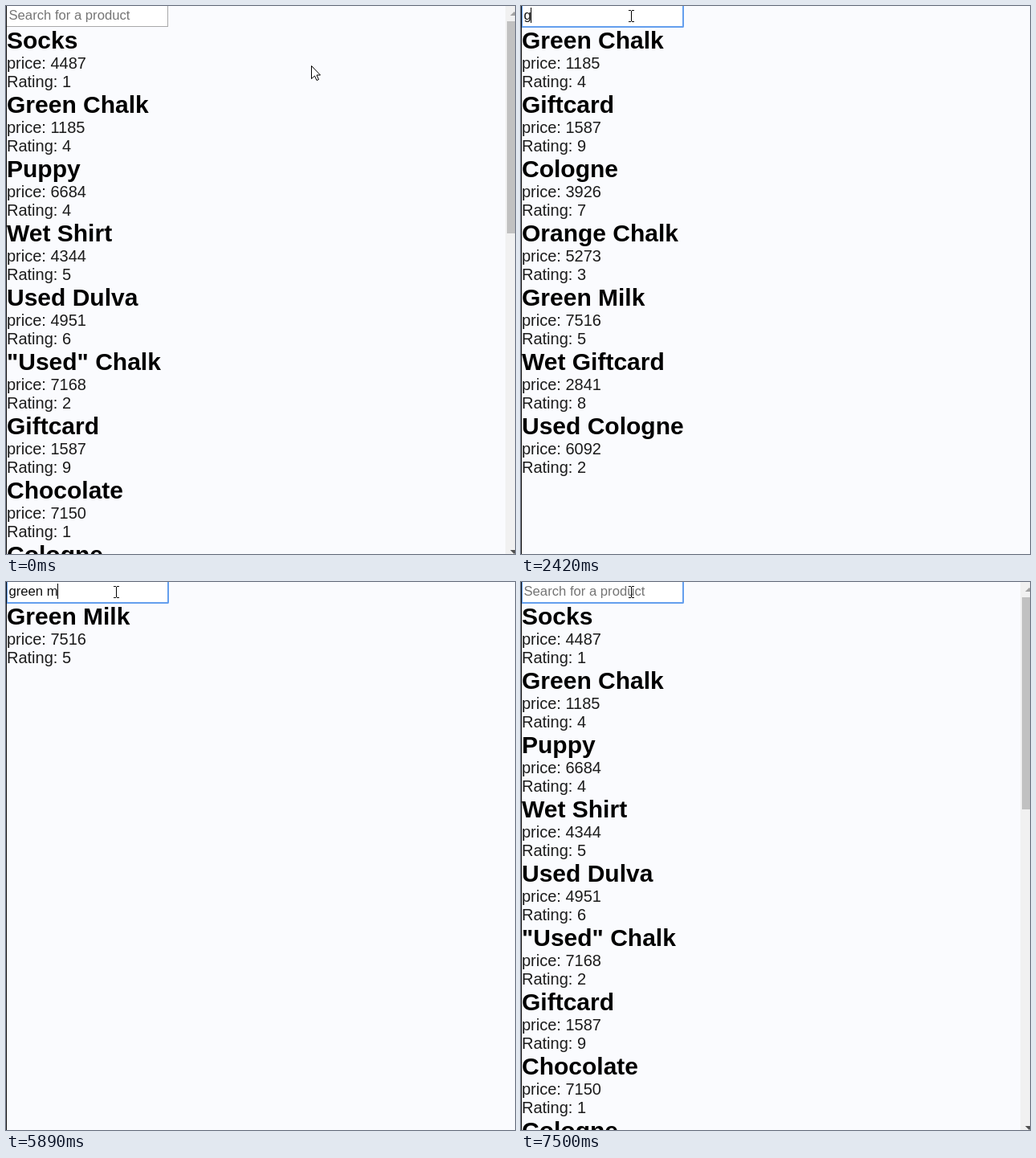
An HTML page with a canvas for the animation above (8 s loop, 634 px wide and 682 px high).

```html
<!DOCTYPE html>
<html lang="en">
<head>
<meta charset="utf-8">
<title>Product search</title>
<style>
  html, body { margin: 0; width: 100%; height: 100%; overflow: hidden; }
  body { position: relative; background: #fafbfe; font: 20px/23px "Liberation Sans", Arial, sans-serif; color: #1c1c1c; }
  #edge { position: absolute; left: 0; top: 0; width: 1px; height: 100%; background: #111; }
  #field { position: absolute; left: 1px; top: 0; width: 200px; height: 25px; background: #fff;
    border: solid #a9a9a9; border-width: 0 1px 1px 0; }
  #field.focus { width: 199px; border-color: #649fee; border-width: 0 2px 2px 1px; border-radius: 0 0 2px 0; }
  #query { position: absolute; left: 3.5px; top: 2px; font-size: 16.667px; line-height: 19px; white-space: pre; color: #111; }
  #query.hint { color: #757575; }
  #caret { position: absolute; top: 2px; width: 1px; height: 19px; background: #000; }
  #list { position: absolute; left: 1px; top: 26px; white-space: nowrap; }
  h1 { margin: 0; font-size: 30px; line-height: 34px; color: #000; }
  canvas { position: absolute; left: 0; top: 0; }
</style>
</head>
<body>
<div id="edge"></div>
<div id="field"></div>
<div id="list"></div>
<div id="query"></div>
<div id="caret"></div>
<canvas id="overlay" width="634" height="682"></canvas>
<script>
const LOOP = 8000, W = 634, H = 682, TEXT_X = 3.5;
const FOCUS_AT = 1480, CARET_AT = 1530, BLINK = 510;

const products = [
  ["Socks", 4487, 1], ["Green Chalk", 1185, 4], ["Puppy", 6684, 4],
  ["Wet Shirt", 4344, 5], ["Used Dulva", 4951, 6], ['"Used" Chalk', 7168, 2],
  ["Giftcard", 1587, 9], ["Chocolate", 7150, 1], ["Cologne", 3926, 7],
  ["Orange Chalk", 5273, 3], ["Green Milk", 7516, 5], ["Wet Giftcard", 2841, 8],
  ["Used Cologne", 6092, 2]
];

// Each word speeds up as it is typed; deleting keeps an even pace.
const wordKeys = (word, start, end) => [...word].map((_, i) =>
  start + (end - start) * (1 - (1 - i / (word.length - 1)) ** 1.4));
const words = ["green", " milk"];
const phrase = words.join("");
const presses = [...wordKeys(words[0], 2420, 3520), ...wordKeys(words[1], 3980, 4870)];
const deletes = [...phrase].map((_, i) => 5460 + i * 1860 / (phrase.length - 1));

const arrow = [[0, 0], [0, 16], [4, 12.5], [6.5, 18], [9, 17], [6.5, 11.5], [11, 11.5]];

const $ = id => document.getElementById(id);
const field = $("field"), query = $("query"), caret = $("caret"), list = $("list");
const ctx = $("overlay").getContext("2d");
let shown = null;

const past = (times, t) => times.filter(time => time <= t);
const typedAt = t => phrase.slice(0, past(presses, t).length - past(deletes, t).length);

// Blinking restarts with every typed letter.
function caretVisible(t) {
  const since = t - Math.max(CARET_AT, ...past(presses, t));
  return since >= 0 && Math.floor(since / BLINK) % 2 === 0;
}

function ease(t, start, end) {
  const k = Math.min(1, Math.max(0, (t - start) / (end - start)));
  return k * k * (3 - 2 * k);
}

function pointerAt(t) {
  const nudge = ease(t, 40, 100), sweep = ease(t, 430, 710), rise = ease(t, 790, 1300);
  return [380 + 2 * nudge - 241 * sweep - 4 * rise,
          74 + 4 * nudge - 26 * sweep - 40 * rise].map(Math.round);
}

function addLine(tag, text) {
  const el = document.createElement(tag);
  el.textContent = text;
  list.append(el);
}

function showQuery(text) {
  if (text === shown) return;
  shown = text;
  query.textContent = text || "Search for a product";
  query.className = text ? "" : "hint";
  list.textContent = "";
  for (const [name, price, rating] of products) {
    if (!name.toLowerCase().includes(text)) continue;
    addLine("h1", name);
    addLine("div", "price: " + price);
    addLine("div", "Rating: " + rating);
  }
  ctx.font = '16.667px "Liberation Sans", Arial, sans-serif';
  caret.style.left = Math.max(4, Math.floor(TEXT_X + ctx.measureText(text).width)) + "px";
}

function rect(color, x, y, w, h) {
  ctx.fillStyle = color;
  ctx.fillRect(x, y, w, h);
}

function polygon(color, points, x, y) {
  ctx.beginPath();
  points.forEach(([px, py]) => ctx.lineTo(x + px, y + py));
  ctx.closePath();
  ctx.fillStyle = color;
  ctx.fill();
}

function drawScrollbar() {
  rect("#f1f1f1", 622, 0, 12, H);
  rect("#c1c1c1", 624, 19, 10, 264);
  polygon("#a3a3a3", [[-5, 5], [0, 0], [5, 5]], 633, 7);
  polygon("#505050", [[-5, 0], [0, 5], [5, 0]], 633, 677);
}

function drawPointer(x, y) {
  if (y < 26) {
    rect("#000", x, y - 6, 1, 13);
    for (const end of [-7, 7]) {
      rect("#000", x - 3, y + end, 3, 1);
      rect("#000", x + 1, y + end, 3, 1);
    }
  } else {
    polygon("#fff", arrow, x + 0.5, y + 0.5);
    ctx.strokeStyle = "#000";
    ctx.stroke();
  }
}

function draw(t) {
  const text = typedAt(t);
  showQuery(text);
  field.className = t >= FOCUS_AT ? "focus" : "";
  caret.style.display = caretVisible(t) ? "block" : "none";
  ctx.clearRect(0, 0, W, H);
  if (!text) drawScrollbar();
  drawPointer(...pointerAt(t));
}

const start = performance.now();
function tick() {
  draw((performance.now() - start) % LOOP);
  requestAnimationFrame(tick);
}
tick();
</script>
</body>
</html>
```
